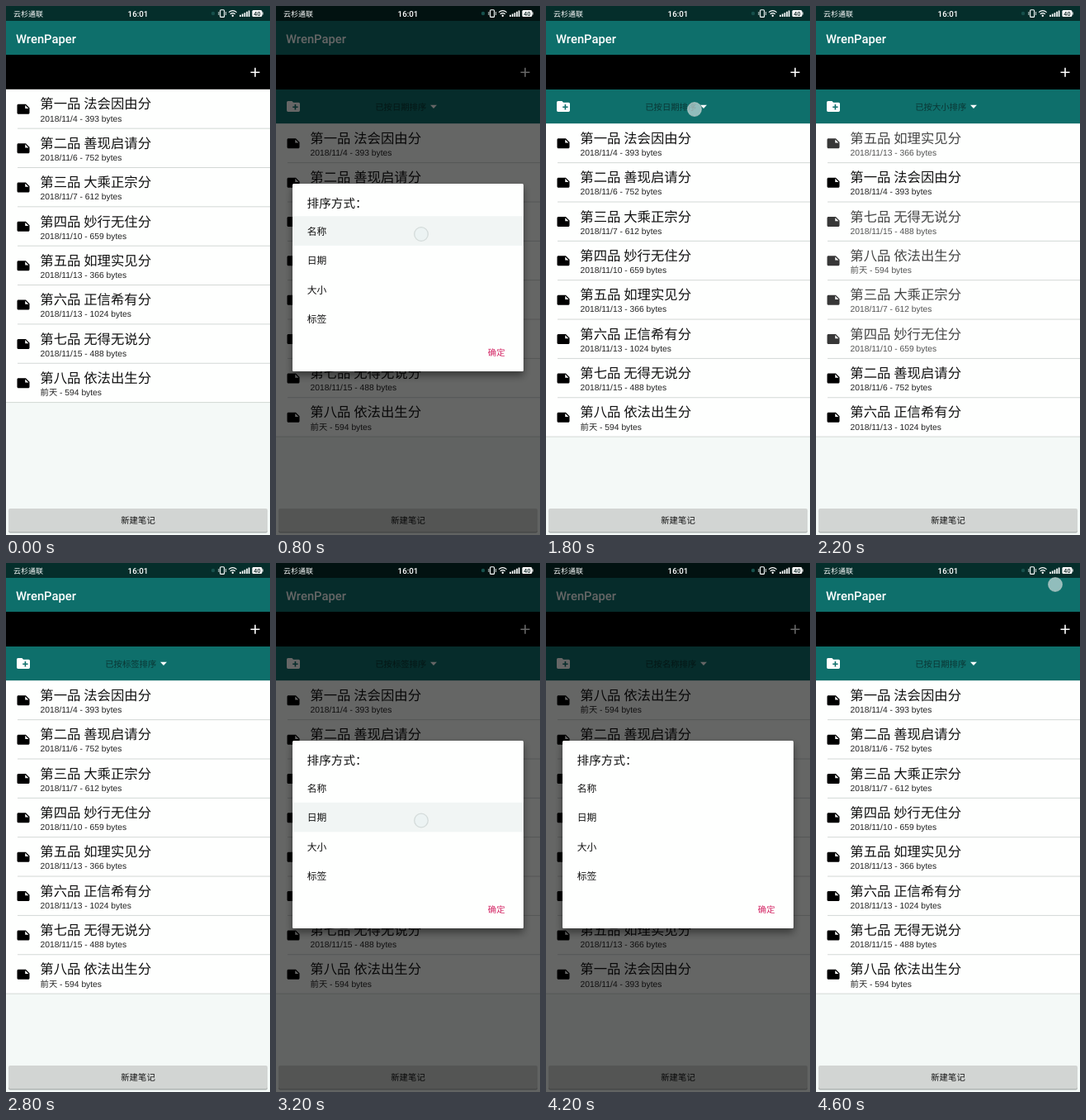
Write an HTML page that moves like this. It is 320 by 640 pixels and loops after 4800 ms.

```html
<!DOCTYPE html>
<html lang="zh-CN">
<head>
<meta charset="utf-8">
<title>Note sorting</title>
<style>
html, body { margin: 0; width: 100%; height: 100%; overflow: hidden; }
svg { display: block; width: 320px; height: 640px; }
text { font-family: "Noto Sans CJK SC", "Noto Sans CJK", sans-serif; text-rendering: geometricPrecision; }
.latin { font-family: Roboto, "Noto Sans CJK SC", "Noto Sans CJK", sans-serif; font-weight: 500; }
.info { font-family: "Liberation Sans", "Noto Sans CJK SC", "Noto Sans CJK", sans-serif; font-size: 10.3px; fill: #222; }
.mid { text-anchor: middle; }
</style>
</head>
<body>
<svg viewBox="0 0 320 640">
  <defs>
    <filter id="shadow" x="-10%" y="-10%" width="120%" height="125%">
      <feDropShadow dx="0" dy="5" stdDeviation="5" flood-opacity=".45"/>
    </filter>
    <path id="note" d="M22 10l-6-6H4c-1.1 0-2 .9-2 2v12c0 1.1.9 2 2 2h16c1.1 0 2-.9 2-2zm-7-4.5l5.5 5.5H15z"/>
  </defs>
  <rect width="320" height="640" fill="#f4f9f7"/>
  <rect width="320" height="18" fill="#052e2b"/>
  <rect y="18" width="320" height="41" fill="#0e6f6b"/>
  <text class="latin" x="12" y="44.5" font-size="14.8" fill="#fff">WrenPaper</text>
  <rect y="59" width="320" height="42" fill="#000"/>
  <path d="M296.5 80.3h11M302 74.8v11" stroke="#fff" stroke-width="1.6"/>

  <g id="bar">
    <rect y="101" width="320" height="41.5" fill="#0e6f6b"/>
    <path transform="translate(11.4 111.9) scale(.8)" fill="#fff" d="M20 6h-8l-2-2H4c-1.1 0-2 .9-2 2v12c0 1.1.9 2 2 2h16c1.1 0 2-.9 2-2V8c0-1.1-.9-2-2-2zm-1 8h-3v3h-2v-3h-3v-2h3V9h2v3h3z"/>
    <text id="label" x="120.2" y="125.6" font-size="10.35" fill="#0b3634"></text>
    <path d="M187 119.8h8l-4 4.2z" fill="#fff"/>
  </g>

  <g id="list"></g>

  <rect x="3" y="609.5" width="314" height="28" rx="2" fill="#aeb3b1"/>
  <rect x="3" y="608" width="314" height="28" rx="2" fill="#d2d5d3"/>
  <text class="mid" x="160" y="625.8" font-size="10.4" font-weight="500" fill="#111">新建笔记</text>

  <rect id="dim" width="320" height="640"/>

  <g fill="#fff">
    <text x="9" y="12.5" font-size="9" font-weight="500">云杉通联</text>
    <text class="latin mid" x="160" y="12.6" font-size="9.8">16:01</text>
    <circle cx="251" cy="9" r="2.2" fill="#17504c"/>
    <rect x="259.6" y="4.8" width="5" height="8.6" rx="1" fill="none" stroke="#fff" stroke-width="1.1"/>
    <path d="M257.8 7v4M266.6 7v4" stroke="#fff" stroke-width=".8"/>
    <path d="M270 7.6q4.8-3.8 9.6 0M271.8 9.7q3-2.3 6 0" fill="none" stroke="#fff" stroke-width="1.2"/>
    <circle cx="274.8" cy="11.7" r="1.2"/>
    <path d="M284 13v-2.2M286.7 13v-3.4M289.4 13v-4.8M292.1 13v-6.2M294.6 13v-7.6" stroke="#fff" stroke-width="1.7"/>
    <rect x="298.4" y="5" width="12" height="8" rx="1.5"/>
    <rect x="310.4" y="7.4" width="1.2" height="3.2"/>
    <text class="latin mid" x="304.4" y="11.6" font-size="7.2" fill="#08211f">40</text>
  </g>

  <g id="dialog">
    <rect x="20" y="215" width="280" height="227" rx="1.5" fill="#fefffe" filter="url(#shadow)"/>
    <rect id="press" x="20" width="280" height="35.6" fill="#f1f5f4"/>
    <text x="37.6" y="244.3" font-size="14.6" fill="#111">排序方式：</text>
    <g id="options" font-size="11.8" fill="#111"></g>
    <text x="256.8" y="423.3" font-size="10.4" font-weight="500" fill="#d32463">确定</text>
  </g>
  <circle id="touch" r="8.3" fill="#eaf2f1" fill-opacity=".6" stroke="#c4cecc" stroke-opacity=".65" stroke-width="1.3"/>
</svg>
<script>
const el = id => document.getElementById(id);
const show = (node, on) => node.setAttribute("visibility", on ? "visible" : "hidden");

const keys = ["名称", "日期", "大小", "标签"];
const orders = ["82673451", "12345678", "51783426", "12345678"];
const NAME = 0, DATE = 1, SIZE = 2, TAG = 3;
const rowHeight = 47.35;

const notes = [
  ["第一品 法会因由分", "2018/11/4", 393],
  ["第二品 善现启请分", "2018/11/6", 752],
  ["第三品 大乘正宗分", "2018/11/7", 612],
  ["第四品 妙行无住分", "2018/11/10", 659],
  ["第五品 如理实见分", "2018/11/13", 366],
  ["第六品 正信希有分", "2018/11/13", 1024],
  ["第七品 无得无说分", "2018/11/15", 488],
  ["第八品 依法出生分", "前天", 594]
];

el("list").innerHTML = `<rect width="320" height="${rowHeight * 8}" fill="#fefffe"/>` +
  notes.map(([title, date, size], i) => {
    const line = (i + 1) * rowHeight;
    return `<g class="row">
      <use href="#note" transform="translate(12 15) scale(.75)"/>
      <text x="41.3" y="23.7" font-size="16.4" fill="#111">${title}</text>
      <text class="info" x="41.6" y="38.8">${date} - ${size} bytes</text>
    </g><path d="M${i < 7 ? 14 : 0} ${line}H320" stroke="#d3d8d6"/>`;
  }).join("");
const rows = [...document.querySelectorAll(".row")];

const optionTop = i => 254.3 + i * 35.5;
el("options").innerHTML = keys.map((key, i) =>
  `<text x="37.8" y="${optionTop(i) + 22.3}">${key}</text>`).join("");

const onLabel = [180, 125];
const onOption = i => [176, 276 + i * 35.5];
const list = (sort, more) => ({ sort, dim: 0, ...more });
const dialog = (sort, more) => ({ sort, dim: 1, ...more });
const pressed = (sort, press) => dialog(sort, { press, touch: onOption(press) });

// one state per 200 ms
const steps = [
  list(DATE, { folded: true }), list(DATE), list(DATE, { touch: onLabel }),
  dialog(DATE), pressed(DATE, NAME),
  list(NAME), list(NAME, { touch: onLabel }), dialog(NAME),
  list(DATE), list(DATE, { touch: onLabel }), dialog(DATE),
  list(SIZE, { settled: "126" }), dialog(SIZE), pressed(SIZE, TAG),
  list(TAG), dialog(TAG), pressed(TAG, DATE),
  list(DATE), dialog(DATE), pressed(DATE, NAME),
  list(NAME), dialog(NAME), list(DATE, { dim: .3 }),
  list(DATE, { touch: [290, 26] })
];

function draw({ sort, dim, folded, press, touch, settled }) {
  show(el("bar"), !folded);
  el("label").textContent = `已按${keys[sort]}排序`;
  el("list").setAttribute("transform", `translate(0 ${folded ? 100.8 : 142.3})`);
  rows.forEach((row, i) => {
    const id = String(i + 1);
    row.setAttribute("transform", `translate(0 ${orders[sort].indexOf(id) * rowHeight})`);
    row.setAttribute("opacity", settled && !settled.includes(id) ? .78 : 1);
  });
  el("dim").setAttribute("opacity", dim * .6);
  el("dialog").setAttribute("opacity", dim);
  show(el("press"), press !== undefined);
  el("press").setAttribute("y", optionTop(press || 0));
  show(el("touch"), touch);
  if (touch) el("touch").setAttribute("transform", `translate(${touch})`);
}

let last = -1;
function tick() {
  const step = Math.floor(performance.now() % 4800 / 200);
  if (step !== last) draw(steps[last = step]);
  requestAnimationFrame(tick);
}
tick();
</script>
</body>
</html>
```
